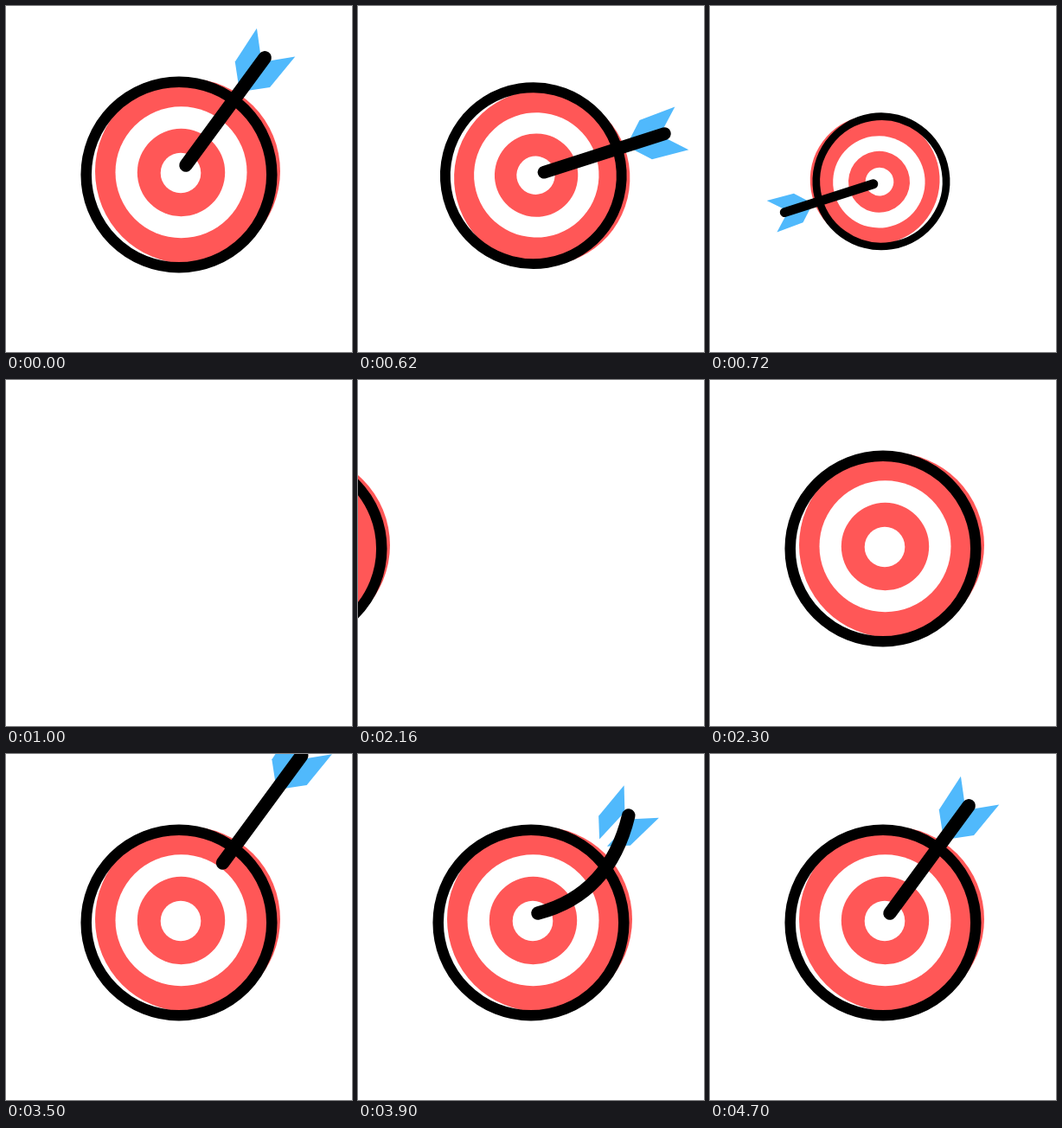
Write an HTML page with a canvas that moves like this. It is 400x400 px and loops after 6 s.

```html
<!DOCTYPE html>
<html lang="en">
<head>
<meta charset="utf-8">
<title>Bullseye</title>
<style>
html, body { margin: 0; width: 100%; height: 100%; overflow: hidden; background: #fff; }
canvas { display: block; width: 100vmin; height: 100vmin; }
</style>
</head>
<body>
<canvas id="stage" width="400" height="400"></canvas>
<script>
const ctx = document.getElementById('stage').getContext('2d');
const LOOP = 6000;
const RED = '#ff5757', WHITE = '#fff', BLACK = '#000', BLUE = '#50b9fc';

const TIP = { x: 208, y: 184 };
const AIM = Math.atan2(-124, 91);
const SHAFT = 154;
const BEND_TURN = 6.6 * Math.PI / 180;
const BEND_BOW = 46;

// Arrow wobble after impact, one value per 100 ms
const WOBBLE = [1.3, -1.2, 1, -1, 1.35];

function disc(x, y, r, color) {
  ctx.fillStyle = color;
  ctx.beginPath();
  ctx.arc(x, y, r, 0, Math.PI * 2);
  ctx.fill();
}

function drawTarget() {
  disc(210, 191, 107, RED);
  disc(202.5, 192.2, 76, WHITE);
  disc(202.5, 192.5, 50.7, RED);
  disc(202, 193, 23.3, WHITE);
  ctx.strokeStyle = BLACK;
  ctx.lineWidth = 12.5;
  ctx.beginPath();
  ctx.arc(200, 195, 107.3, 0, Math.PI * 2);
  ctx.stroke();
}

function drawFeather(side) {
  ctx.beginPath();
  ctx.moveTo(111, 6 * side);
  ctx.lineTo(130, 25 * side);
  ctx.lineTo(176, 27.5 * side);
  ctx.lineTo(154, 6 * side);
  ctx.closePath();
  ctx.fill();
}

// Drawn along +x from the tip; out moves it back along its flight path
function drawArrow(bend, out) {
  ctx.save();
  ctx.translate(TIP.x, TIP.y);
  ctx.rotate(AIM + bend * BEND_TURN);
  ctx.translate(out, 0);
  ctx.fillStyle = BLUE;
  drawFeather(-1);
  drawFeather(1);
  ctx.strokeStyle = BLACK;
  ctx.lineWidth = 15.5;
  ctx.lineCap = 'round';
  ctx.beginPath();
  ctx.moveTo(0, 0);
  ctx.quadraticCurveTo(72, bend * BEND_BOW, SHAFT, 0);
  ctx.stroke();
  ctx.restore();
}

function spinAway(p) {
  ctx.translate(200, 200);
  ctx.rotate(p * Math.PI * 4);
  ctx.scale(1 - p, 1 - p);
  ctx.translate(-200, -200);
}

function draw(time) {
  const t = Math.floor(time / 20) * 20;
  ctx.fillStyle = WHITE;
  ctx.fillRect(0, 0, 400, 400);
  if (t >= 1000 && t < 2160) return;

  ctx.save();
  if (t > 600 && t < 1000) spinAway((t - 600) / 400);
  else if (t >= 2160 && t < 2300) ctx.translate((t - 2300) * 2, 0);
  else if (t >= 3600 && t < 3700) ctx.translate(-9, 7);

  drawTarget();
  if (t < 1000 || t >= 3500) {
    const bend = WOBBLE[Math.floor((t - 3700) / 100)] || 0;
    drawArrow(bend, t >= 3500 && t < 3600 ? 72 : 0);
  }
  ctx.restore();
}

const start = performance.now();
function tick() {
  draw((performance.now() - start) % LOOP);
  requestAnimationFrame(tick);
}
tick();
</script>
</body>
</html>
```
